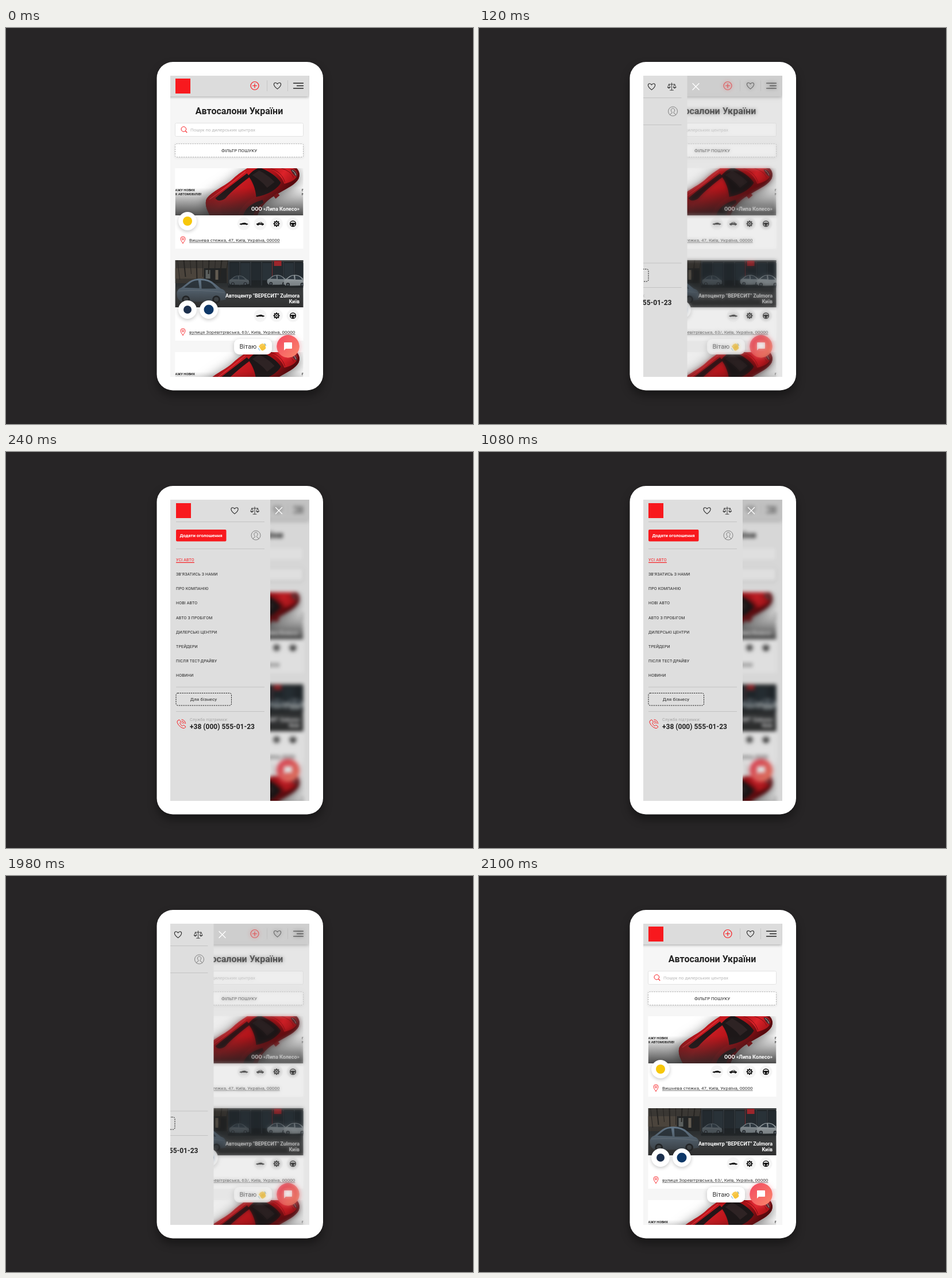
Write an HTML page with a canvas that moves like this. It is 813 by 689 pixels and loops after 2130 ms.

```html
<!DOCTYPE html>
<html lang="uk">
<head>
<meta charset="utf-8">
<title>Автосалони</title>
<style>
  html, body { margin: 0; width: 100%; height: 100%; overflow: hidden; background: #272526; }
  canvas { display: block; width: 813px; height: 689px; }
</style>
</head>
<body>
<canvas id="stage" width="813" height="689"></canvas>
<script>
const W = 813, H = 689, LOOP = 2130, STEP = 30, STEPS = 8, TRAVEL = 24.375;
const SCREEN = { x: 286, y: 83, w: 242, h: 524 };
const RED = '#f8191e', INK = '#222';
const stage = document.getElementById('stage').getContext('2d');
let g = stage;

function layer() {
  const c = document.createElement('canvas');
  c.width = W; c.height = H;
  return c;
}

function rect(x, y, w, h, fill, r = 0) {
  g.fillStyle = fill;
  g.beginPath();
  g.roundRect(x, y, w, h, r);
  g.fill();
}

function circle(x, y, r, fill) {
  g.fillStyle = fill;
  g.beginPath();
  g.arc(x, y, r, 0, Math.PI * 2);
  g.fill();
}

function ring(x, y, r, color, width = 1) {
  g.strokeStyle = color;
  g.lineWidth = width;
  g.beginPath();
  g.arc(x, y, r, 0, Math.PI * 2);
  g.stroke();
}

function line(x1, y1, x2, y2, color, width = 1) {
  g.strokeStyle = color;
  g.lineWidth = width;
  g.beginPath();
  g.moveTo(x1, y1);
  g.lineTo(x2, y2);
  g.stroke();
}

function shape(d, fill, x = 0, y = 0) {
  g.save();
  g.translate(x, y);
  g.fillStyle = fill;
  g.fill(new Path2D(d));
  g.restore();
}

function outline(d, color, width = 1, x = 0, y = 0) {
  g.save();
  g.translate(x, y);
  g.strokeStyle = color;
  g.lineWidth = width;
  g.lineJoin = g.lineCap = 'round';
  g.stroke(new Path2D(d));
  g.restore();
}

function dashed(x, y, w, h, color, r, dash) {
  g.save();
  g.strokeStyle = color;
  g.lineWidth = 1;
  g.setLineDash(dash);
  g.beginPath();
  g.roundRect(x, y, w, h, r);
  g.stroke();
  g.restore();
}

function text(s, x, y, size, color, o = {}) {
  g.font = `${o.weight || 400} ${size}px Roboto, Arial, sans-serif`;
  g.letterSpacing = (o.gap || 0) + 'px';
  g.textAlign = o.align || 'left';
  g.fillStyle = color;
  g.fillText(s, x, y);
  return g.measureText(s).width;
}

function shaded(color, blur, dy, draw) {
  g.save();
  g.shadowColor = color;
  g.shadowBlur = blur;
  g.shadowOffsetY = dy;
  draw();
  g.restore();
}

function fade(x1, y1, x2, y2, ...colors) {
  const f = g.createLinearGradient(x1, y1, x2, y2);
  colors.forEach((c, i) => f.addColorStop(i / (colors.length - 1), c));
  return f;
}

// Icons

const HEART = 'M0 5.6C-8-.2-7-5.2-3.4-5.2C-1.6-5.2-.5-4 0-3C.5-4 1.6-5.2 3.4-5.2C7-5.2 8-.2 0 5.6Z';
const heart = (x, y) => outline(HEART, INK, 1.1, x, y);

function gear(x, y) {
  for (let i = 0; i < 8; i++) {
    const a = i * Math.PI / 4, c = Math.cos(a), s = Math.sin(a);
    line(x + c * 3, y + s * 3, x + c * 5.6, y + s * 5.6, '#111', 2);
  }
  ring(x, y, 3.4, '#111', 1.8);
  circle(x, y, 1.3, '#111');
}

function wheel(x, y) {
  ring(x, y, 4.8, '#111', 1.5);
  shape('M-4.5-1Q0-2.5 4.5-1V1H2L1 4.5H-1L-2 1H-4.5Z', '#111', x, y);
}

function sedan(x, y) {
  shape('M-7.3 1.5L-7-.1L-3.5-.7Q-1-2 2-1.8L5-.4L7.3 .2V1.6Z', '#111', x, y);
  circle(x - 4.4, y + 1.2, 1, '#111');
  circle(x + 4.6, y + 1.2, 1, '#111');
}

function suv(x, y) {
  shape('M-6.5 1.8L-6.3-.2L-4-.8Q-2-2.8 0-2.8H2.5L4.5-.6L6.5 0V1.8Z', '#111', x, y);
  shape('M-2.4-.8L-.8-2H2L3-.8Z', '#ddd', x, y);
  circle(x - 3.8, y + 1.7, 1.3, '#111');
  circle(x + 3.8, y + 1.7, 1.3, '#111');
}

function scales(x, y) {
  outline('M0-6.5V6M-3 6.2H3M-5-4H5M-5-4L-7.2 1.5H-2.8ZM5-4L2.8 1.5H7.2Z', '#333', .9, x, y);
  shape('M-7.4 1.5H-2.6Q-5 5-7.4 1.5ZM2.6 1.5H7.4Q5 5 2.6 1.5Z', '#333', x, y);
}

function person(x, y) {
  ring(x, y, 8, '#777', .9);
  outline('M-5 6Q-4.5 4-1.6 3V1.5C-4.5-2-3-5 0-5S4.5-2 1.6 1.5V3Q4.5 4 5 6', '#777', .9, x, y);
}

function pin(x, y) {
  outline('M0 5.5C-2.5 2-4-.2-4-2A4 4 0 0 1 4-2C4-.2 2.5 2 0 5.5Z', RED, .9, x, y);
  ring(x, y - 1.8, 1.5, RED, .9);
}

// Page

function inPhoto(x, y, draw) {
  g.save();
  g.beginPath();
  g.rect(x, y, 223, 82);
  g.clip();
  g.translate(x, y);
  draw();
  g.restore();
}

function carPhoto(x, y) {
  inPhoto(x, y, () => {
    rect(0, 0, 223, 82, '#fff');
    const body = 'M54 55C60 42 84 33 99 20C109 10 122 2 134-5H200C214-3 219 8 215 18C210 28 196 34 181 43C163 53 150 62 141 88H64C58 78 51 66 54 55Z';
    shaded('rgba(0,0,0,.6)', 22, 4, () => shape(body, '#a81318'));
    shape(body, fade(70, 20, 150, 88, '#a01017', '#c9191f', '#ab1218', '#560a0e'));
    // side glass
    shape('M70 52C86 38 108 22 125 9L130 15C113 28 98 40 88 52C82 57 73 58 70 52Z', '#231618');
    outline('M60 54C80 40 102 23 122 6', '#e2323a', 1.4);
    // roof
    shape('M86 54C99 40 115 27 128 18C134 26 138 38 139 50C124 58 115 68 108 84H84C78 73 78 63 86 54Z', fade(85, 25, 130, 80, '#d2242b', '#bd151b', '#7d0d12'));
    // windscreen
    shape('M127 13C134 5 141 0 148-1C163 5 177 14 184 25C178 37 159 47 141 50C140 36 135 23 127 13Z', '#1d1718');
    shape('M134 12L146 4C156 9 166 16 173 24L160 34C153 25 144 18 134 12Z', '#2e2324');
    // lower side glass
    shape('M119 80C125 66 136 60 152 55L154 60C144 66 138 74 135 84H119Z', '#2a181a');
    // bonnet
    shape('M157-2C174 4 186 14 190 27C203 24 213 18 213 10C212 2 202-3 190-3Z', fade(165, 0, 205, 28, '#b3141a', '#dc2229', '#a81318'));
    outline('M166 0C180 5 187 12 191 24M182-1C195 3 203 8 206 16', '#7c0e13', 1);
    shape('M201 2C208 1 213 7 212 15C207 13 203 8 201 2Z', '#4a2b2d');
    outline('M204 4Q209 7 210 12', '#ddd', .8);
    shape('M171 48L178 43L182 47L175 53Z', '#8a1015');
    text('АЖУ НОВИХ', 0, 40, 5.8, INK, { weight: 700 });
    text('Х АВТОМОБІЛІВ!', 0, 47, 5.8, INK, { weight: 700 });
    text('П', 220.5, 40, 5.8, INK, { weight: 700 });
    text('Н', 220.5, 47, 5.8, INK, { weight: 700 });
    rect(0, 34, 223, 48, fade(0, 34, 0, 82, 'rgba(40,40,40,0)', 'rgba(40,40,40,.83)'));
  });
}

function parkedCar(x, y, k, color) {
  g.save();
  g.translate(x, y);
  g.scale(k, k);
  shape('M0 28Q0 19 8 17L22 6Q30 1 42 1Q58 1 67 10L78 19Q86 21 87 28V38Q70 43 10 42Q0 40 0 28Z', color);
  shape('M13 17L25 8Q30 4 38 4L40 18ZM43 4Q55 4 63 11L70 19H44Z', '#2c363e');
  outline('M3 23Q45 20 84 26', 'rgba(255,255,255,.2)', 1);
  for (const wx of [16, 70]) {
    circle(wx, 38, 7, '#1c2024');
    circle(wx, 38, 4, '#59636b');
  }
  g.restore();
}

function streetPhoto(x, y) {
  inPhoto(x, y, () => {
    rect(0, 0, 223, 82, fade(0, 0, 0, 82, '#2f2f2e', '#2c3032', '#4a4d4f'));
    rect(0, 0, 92, 40, '#3a3733');
    rect(0, 14, 50, 18, '#4b443c');
    rect(50, 14, 40, 26, '#222425');
    rect(53, 17, 8, 15, '#5c605f');
    rect(70, 17, 5, 17, '#625b51');
    for (let i = 0; i < 9; i++) line(4 + i * 11, 0, 8 + i * 10, 34 - i % 3 * 5, '#262422', 1 + i % 2);
    rect(92, 0, 131, 48, '#1e2326');
    for (let i = 0; i < 7; i++) {
      rect(95 + i * 19, 5, 16, 30, i % 2 ? '#293238' : '#232a2f');
      line(93.5 + i * 19, 0, 93.5 + i * 19, 44, '#3f474c', 1);
    }
    rect(92, 0, 131, 3, '#3d4041');
    rect(172, 1, 13, 9, '#9c262c');
    line(169, 0, 169, 42, '#6c2c30', 1.2);
    parkedCar(94, 26, .4, '#4e575d');
    parkedCar(160, 25, .42, '#7a8388');
    parkedCar(189, 25, .46, '#8f979b');
    rect(0, 45, 223, 37, fade(0, 45, 0, 60, 'rgba(80,83,85,0)', 'rgba(80,83,85,.6)'));
    parkedCar(3, 31, .98, '#64788a');
    rect(0, 32, 223, 50, fade(0, 32, 0, 82, 'rgba(40,40,40,0)', 'rgba(40,40,40,.83)'));
  });
}

function badge(x, y, color, r) {
  shaded('rgba(0,0,0,.22)', 6, 2, () => circle(x, y, 16, '#fff'));
  circle(x, y, r, color);
}

function card(y, photo, title, icons, address) {
  const x = 294.5;
  rect(x, y, 223, 140, '#fff');
  photo(x, y);
  title.forEach((s, i) => text(s, 511, y + 74 + (i - title.length + 1) * 10.5 + (title.length - 1), 9, '#fff', { weight: 700, align: 'right' }));
  icons.forEach((icon, i) => {
    const cx = 499.5 - (icons.length - 1 - i) * 28.5;
    circle(cx, y + 96.5, 11, '#f5f5f5');
    icon(cx, y + 96.5);
  });
  pin(308, y + 125);
  const w = text(address, 319, y + 127.5, 8, '#333', { gap: .11 });
  line(319, y + 129.5, 319 + w, y + 129.5, '#666', .8);
}

function header() {
  shaded('rgba(0,0,0,.35)', 5, 1, () => rect(250, 60, 277, 59, '#dcdcdc'));
  rect(295, 88, 26, 26, RED);
  ring(433, 100.5, 7, RED, 1.2);
  outline('M-3.5 0H3.5M0-3.5V3.5', RED, 1.2, 433, 100.5);
  line(454.5, 91, 454.5, 110, '#c6c6c6');
  line(490.5, 91, 490.5, 110, '#c6c6c6');
  heart(472.5, 100.5);
  outline('M0-4.5H17M6 0H17M0 4.5H17', INK, 1.3, 500.5, 100.5);
}

function chat() {
  shaded('rgba(0,0,0,.22)', 8, 2, () => rect(397, 541, 66, 27, '#fff', 9));
  text('Вітаю', 406.5, 558, 11, '#333');
  g.save();
  g.translate(446, 555);
  g.rotate(-.6);
  for (let i = 0; i < 4; i++) rect(-4.2 + i * 2.3, -6 + Math.abs(i - 1.5) * .8, 2.1, 8, '#f6c33c', 1);
  rect(-4.4, -1, 9.2, 7, '#f6c33c', 3);
  outline('M4 2L6.5-1.5', '#f6c33c', 2.2);
  g.restore();
  outline('M4-6Q6-5 6.4-2.5M-6.4 2.5Q-6 5-4 6', '#55a5dc', 1, 446, 555);
  shaded('rgba(248,80,100,.5)', 9, 1, () => circle(491, 554, 19.5, '#f65f66'));
  circle(491, 554, 19.5, fade(476, 540, 506, 570, '#f44f62', '#fa826a'));
  shape('M-6-7H6Q7-7 7-6V3Q7 4 6 4H-4L-7 7V-6Q-7-7-6-7Z', '#fff', 491, 554);
}

function page() {
  rect(0, 0, W, H, '#f6f6f6');
  header();
  text('Автосалони України', 406, 150, 16, INK, { weight: 700, align: 'center' });

  rect(294.5, 165.5, 223, 23, '#fff', 2);
  dashed(294.5, 165.5, 223, 23, '#e3e3e3', 2, []);
  ring(309.3, 176, 4.3, RED, 1);
  line(312.4, 179.2, 315.2, 182, RED, 1.1);
  text('Пошук по дилерських центрах', 321, 179.5, 7.9, '#b7b7b7');

  shaded('rgba(0,0,0,.12)', 5, 1, () => rect(294.5, 201.5, 223, 23, '#fff', 2));
  dashed(294.5, 201.5, 223, 23, '#adadad', 2, [2, 2]);
  text('ФІЛЬТР ПОШУКУ', 406, 215.5, 7.8, INK, { align: 'center' });

  card(244, carPhoto, ['ООО «Липа Колесо»'], [sedan, suv, gear, wheel],
    'Вишнева стежка, 47, Київ, Україна, 00000');
  badge(316, 336, '#f7c70a', 8);
  card(404, streetPhoto, ['Автоцентр "ВЕРЕСИТ" Zulmora', 'Київ'], [sedan, gear, wheel],
    'вулиця Зоревітрівська, 63/, Київ, Україна, 00000');
  badge(316, 490, '#1c2f4c', 7);
  badge(353, 490, '#0d3767', 8.5);
  card(564, carPhoto, [], [], '');
  chat();
}

// Side menu, laid out from its right edge

const MENU = ['УСІ АВТО', 'ЗВ’ЯЗАТИСЬ З НАМИ', 'ПРО КОМПАНІЮ', 'НОВІ АВТО', 'АВТО З ПРОБІГОМ',
  'ДИЛЕРСЬКІ ЦЕНТРИ', 'ТРЕЙДЕРИ', 'ПІСЛЯ ТЕСТ-ДРАЙВУ', 'НОВИНИ'];

function menu(edge) {
  g.save();
  g.translate(edge, 0);
  rect(-260, SCREEN.y, 260, SCREEN.h, '#dedede');
  for (const y of [121.5, 168.5, 409, 451.5]) line(-164, y, -10, y, '#c3c3c3');

  rect(-164, 89, 26, 26, RED);
  heart(-62, 102);
  scales(-27, 102);
  rect(-164, 135, 87.5, 20.5, RED, 2);
  text('Додати оголошення', -120.5, 148, 7.8, '#fff', { weight: 700, align: 'center' });
  person(-25, 145);

  MENU.forEach((s, i) => {
    const w = text(s, -164, 189.7 + i * 25.2, 7, i ? INK : RED, { gap: .2 });
    if (!i) line(-164, 192.3, -164 + w, 192.3, RED, 1.2);
  });

  dashed(-164, 419.5, 96.5, 21.5, INK, 3, [2.4, 1.4]);
  text('Для бізнесу', -116, 433, 8, INK, { gap: .2, align: 'center' });

  outline('M-6-5.5L-4-7Q-3-7.3-2.3-6.2L-.8-3.7Q-.6-2.8-1.6-2L-2.3-1.2Q-.8 2.2 2 3.8L3 2.8Q3.8 2 4.8 2.6L7.2 4.2Q8 5 7.3 6L5.8 7.5Q3.5 8.5-.5 5.8Q-5.5 2.5-7-2.5Q-7.4-4.4-6-5.5ZM1-7.5Q7-6.5 7.5-.5M1-4.8Q4.6-4.2 5-.8M1-2Q2.3-1.8 2.4-.8', RED, 1, -155, 473);
  text('Служба підтримки:', -140, 468, 7, '#a6a6a6', { gap: .24 });
  text('+38 (000) 555-01-23', -140, 482, 12, INK, { weight: 700 });

  outline('M-5.5-5.5L5.5 5.5M5.5-5.5L-5.5 5.5', '#fff', 1.4, 15, 102);
  g.restore();
}

const sharp = layer(), soft = layer();
g = sharp.getContext('2d');
page();
g = soft.getContext('2d');
g.filter = 'blur(3px)';
g.drawImage(sharp, 0, 0);
g.filter = 'none';
rect(0, 0, W, H, 'rgba(0,0,0,.125)');
g = stage;

function openSteps(t) {
  const steps = t < 1080 ? Math.floor(t / STEP) : STEPS - 1 - Math.floor((t - 1890) / STEP);
  return Math.max(0, Math.min(STEPS, steps));
}

function draw(t) {
  const n = openSteps(t);
  const edge = (t < 1080 ? 460 : 459) - (STEPS - n) * TRAVEL;
  rect(0, 0, W, H, '#272526');
  shaded('rgba(0,0,0,.4)', 16, 9, () => rect(262.5, 59, 289.5, 571.5, '#fff', 28));
  g.save();
  g.beginPath();
  g.rect(SCREEN.x, SCREEN.y, SCREEN.w, SCREEN.h);
  g.clip();
  g.drawImage(sharp, 0, 0);
  if (n > 0) {
    g.globalAlpha = n / STEPS;
    g.drawImage(soft, 0, 0);
    g.globalAlpha = 1;
    menu(edge);
  }
  g.restore();
}

const start = performance.now();
function tick() {
  draw((performance.now() - start) % LOOP);
  requestAnimationFrame(tick);
}
tick();
</script>
</body>
</html>
```
